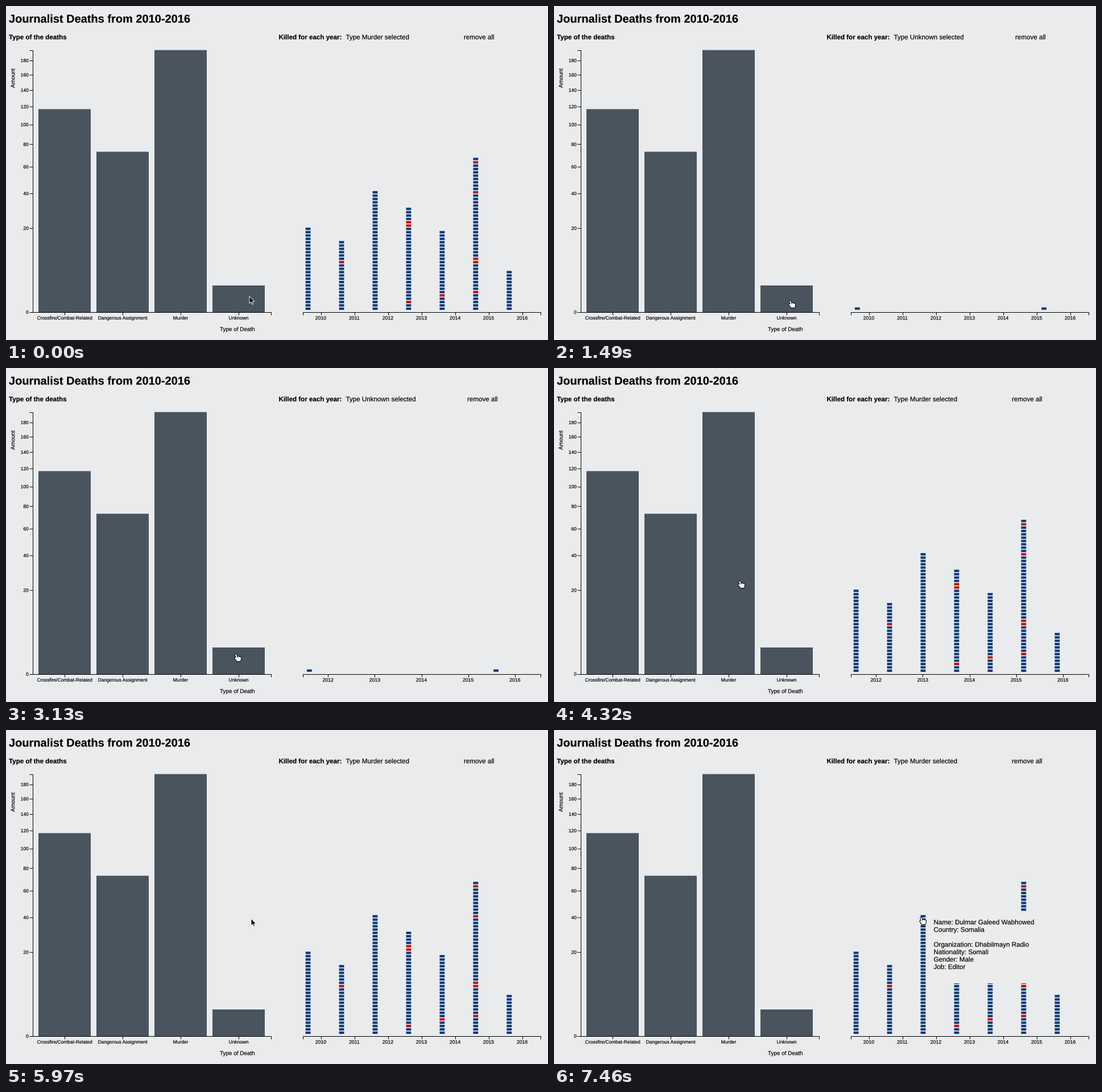
A matplotlib script for the animation above (8 s loop, 953 px wide and 588 px high).

```python
import numpy as np
import matplotlib.pyplot as plt
from matplotlib import patheffects
from matplotlib.animation import FuncAnimation
from matplotlib.collections import PolyCollection
from matplotlib.patches import Polygon, Rectangle

W, H, DPI = 953, 588, 64
PX = 72 / DPI          # one pixel in points
STEP_MS = 50
BEAT = 149.1           # the screen refreshes on this beat, in ms

BG, BAR, BLUE, RED = "#e9ebed", "#4a545f", "#0a3a78", "#cc0406"

plt.rcParams["font.family"] = "Liberation Sans"
plt.rcParams["text.hinting"] = "none"
plt.rcParams["toolbar"] = "None"

fig = plt.figure(figsize=(W / DPI, H / DPI), dpi=DPI, facecolor=BG)
ax = fig.add_axes([0, 0, 1, 1])
ax.set_xlim(0, W)
ax.set_ylim(H, 0)
ax.axis("off")

# draws glyphs as outlines, so text can sit between pixels
OUTLINE = [patheffects.Stroke(linewidth=0.2)]


def label(x, y, s, size, **kw):
    return ax.text(x, y, s, fontsize=size * PX, color="black", va="baseline",
                   path_effects=OUTLINE, **kw)


def line(xs, ys):
    return ax.plot(xs, ys, color="black", lw=PX, zorder=3,
                   solid_capstyle="butt", solid_joinstyle="miter")[0]


# ---- headings
label(5, 29.2, "Journalist Deaths from 2010-2016", 20, weight="bold")
label(5, 58.6, "Type of the deaths", 11.6, weight="bold")
label(479.5, 58.6, "Killed for each year:", 11.6, weight="bold")
chosen = label(597.5, 58.6, "", 11.6)
remove = label(805, 58.6, "remove all", 11.6)


# ---- left chart, square-root scale
def amount_y(v):
    return 538.7 - 33.02 * np.sqrt(v)


kinds = {"Crossfire/Combat-Related": 117, "Dangerous Assignment": 73,
         "Murder": 195, "Unknown": 2}
bars = []
for i, (name, n) in enumerate(kinds.items()):
    x, top = 57 + 102 * i, amount_y(n)
    bars.append((x, top))
    ax.add_patch(Rectangle((x, top), 92, 539 - top, fc=BAR, lw=0, snap=False))
    line([x + 45.7] * 2, [538.5, 544])
    label(x + 46, 552, name, 8.4, ha="center")

line([40.5, 46.5, 46.5, 40.5], [77.5, 77.5, 538.5, 538.5])
line([46.5, 465.5, 465.5], [538.5, 538.5, 544])
for v in range(0, 200, 20):
    y = amount_y(v)
    line([41, 46.5], [y, y])
    label(39.7, y + 3.1, str(v), 8.4, ha="right")
label(15.3, 127, "Amount", 9.9, rotation=90, rotation_mode="anchor", ha="center")
label(376, 572.2, "Type of Death", 9.9)


# ---- right chart: one small block per person
def blocks(xs, ys, colors):
    corners = np.array([(-4.4, -2.1), (4.4, -2.1), (4.4, 2.1), (-4.4, 2.1)])
    return ax.add_collection(PolyCollection(
        [corners + p for p in zip(xs, ys)], facecolors=colors,
        linewidths=0, snap=False, zorder=2))


counts = [25, 21, 36, 31, 24, 46, 12]
women = {1: [14], 3: [2, 25, 26], 4: [4], 5: [5, 14, 15, 35, 44]}
cells = [(c, r) for c, n in enumerate(counts) for r in range(n)]
murder = blocks([531.1 + 58.95 * c for c, r in cells],
                [532.9 - 5.856 * r for c, r in cells],
                [RED if r in women.get(c, []) else BLUE for c, r in cells])
unknown = blocks([533.4, 861.6], [532.7, 532.7], BLUE)

line([521.5, 521.5, 940, 940], [544, 538.5, 538.5, 544])


def year_x(year, first):
    n = 2017 - first
    return 730.6 + (year - (first + 2016) / 2) * 419 / (n + 0.1)


years = [(y, line([0, 0], [538.5, 544]),
          label(0, 552.1, str(y), 8.7, ha="center", zorder=3))
         for y in range(2010, 2017)]

# ---- tooltip
facts = ["Name: Dulmar Galeed Wabhowed", "Country: Somalia", "",
         "Organization: Dhabilmayn Radio", "Nationality: Somali",
         "Gender: Male", "Job: Editor"]
tip = [ax.add_patch(Rectangle((658, 319.5), 189.5, 126.5, fc="#ececec",
                              lw=0, zorder=5, snap=False))]
tip += [label(667.5, 342.2 + 13.1 * i, s, 11.65, zorder=6)
        for i, s in enumerate(facts) if s]

# ---- pointers
ARROW = np.array([(0, 0), (0, 12.6), (2.9, 9.9), (4.9, 14.3), (6.8, 13.5),
                  (4.9, 9.2), (8.8, 9.0)])
arrow = ax.add_patch(Polygon(ARROW, fc="black", ec="white", lw=0.9 * PX, zorder=8))

# fingers are round strokes running down into the wrist
tips = [(-3.6, -5), (-4.8, 0.6)] + [(0.2 + 2 * i, 0.6 * i - 1.2) for i in range(3)]
HAND = np.array([p for x, y in tips
                 for p in [(x, y), (np.clip(0.8 * x, -1, 4), 5), (np.nan, np.nan)]])
hand = [ax.plot([], [], color=c, lw=w * PX, zorder=8, solid_capstyle="round")[0]
        for c, w in [("black", 4), ("white", 2.1)]]

# pointer track: beat, x, y
track = np.array([(3, 428, 511), (6, 419, 525), (19, 419, 525), (21, 408, 510),
                  (25, 332, 386), (26, 330, 381), (36, 330, 381), (40, 431, 332),
                  (42, 566, 325), (43, 566, 325), (48, 649, 336)]).T


def place_pointer(k):
    x, y = (np.interp(k, track[0], v) for v in track[1:])
    over_bar = any(bx < x < bx + 92 and y > top for bx, top in bars)
    grab = k > 3 and (over_bar or k >= 48)
    arrow.set_visible(not grab)
    arrow.set_xy(ARROW + (x, y))
    for part in hand:
        part.set_visible(grab)
        part.set_data(*(HAND + (x, y)).T)


def ease(k, start):
    u = np.clip((BEAT * (k - start) + 43) / 1500, 0, 1)
    return 4 * u ** 3 if u < 0.5 else 1 - 4 * (1 - u) ** 3


def update(frame):
    k = int((frame * STEP_MS + 48) / BEAT)
    is_unknown = 10 <= k < 29
    murder.set_visible(not is_unknown)
    unknown.set_visible(is_unknown)
    chosen.set_text(f"Type {'Unknown' if is_unknown else 'Murder'} selected")
    remove.set_x(811 if is_unknown else 805)

    # years without data fade in place, the others slide
    p = 0 if k < 10 else ease(k, 10) if k < 29 else 1 - ease(k, 29)
    for year, tick, text in years:
        x = year_x(year, 2010)
        if year >= 2012:
            x += p * (year_x(year, 2012) - x)
        else:
            tick.set_alpha(1 - p)
            text.set_alpha(1 - p)
        tick.set_xdata([x, x])
        text.set_x(x)

    shown = np.clip((k - 48) / 2, 0, 1)
    for part in tip:
        part.set_alpha(shown)
        part.set_visible(shown > 0)
    place_pointer(k)
    return []


anim = FuncAnimation(fig, update, frames=8000 // STEP_MS, interval=STEP_MS,
                     repeat=True, repeat_delay=0, blit=False)
plt.show()
```
